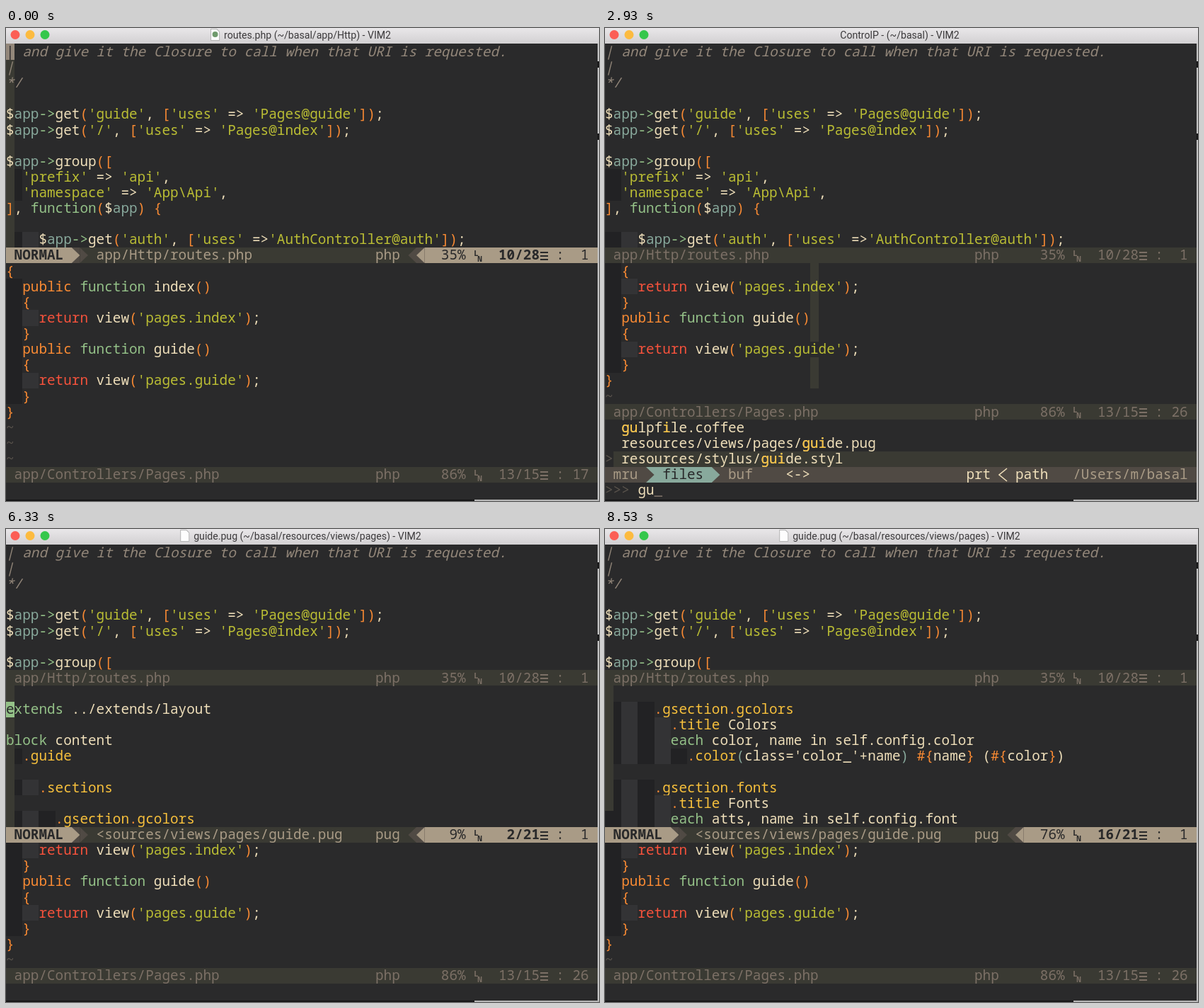
Write an HTML page with a canvas that moves like this. It is 838 px wide and 668 px high and loops after 8760 ms.

```html
<!DOCTYPE html>
<html lang="en">
<head>
<meta charset="utf-8">
<title>Editor session</title>
<style>
  html, body { margin: 0; width: 100%; height: 100%; overflow: hidden; background: #2a2a2b; }
  canvas { display: block; }
</style>
</head>
<body>
<canvas id="stage" width="838" height="668"></canvas>
<script>
const ctx = document.getElementById('stage').getContext('2d');

const LOOP = 8760;
const CELL_W = 11.6, CELL_H = 22.12, GRID_TOP = 22.4, COLS = 72;
const BG = '#2a2a2b', FG = '#efdfba', OLIVE = '#3a3a33', TAN = '#a99b86', BROWN = '#504a44';
const DIM = '#7c7066', FAINT = '#59534c', GRAY = '#93877a', INK = '#29292a';
const GREEN = '#babd34', BLUE = '#88a99c', AQUA = '#94c188', ORANGE = '#f98a33', RED = '#f5523c', YELLOW = '#f7c03c';
const INDENT = ['#222224', '#333335'];

const PHP = {
  pattern: /(^[|*].*)|('[^']*')|(?<=\$)(app)|(->|function)|(public|[()[\]{}])|(return)/g,
  colors: [GRAY, GREEN, BLUE, AQUA, ORANGE, RED],
};
const PUG = {
  pattern: /(?<=^ *)(extends|block|each)\b|(?<=^ *(?:\.\w+)*)(\.)(?=\w)|(?<=^ *(?:\.\w+)*\.)(\w+)|((?<=\.color)\(|\)(?= #))|(#\{|\})/g,
  colors: [AQUA, ORANGE, YELLOW, BLUE, ORANGE],
};

// "start" is the file line number of the first stored line.
const routes = {
  path: 'app/Http/routes.php', type: 'php', total: 28, start: 10, syntax: PHP,
  lines: [
    '| and give it the Closure to call when that URI is requested.',
    '|',
    '*/',
    '',
    "$app->get('guide', ['uses' => 'Pages@guide']);",
    "$app->get('/', ['uses' => 'Pages@index']);",
    '',
    '$app->group([',
    "  'prefix' => 'api',",
    "  'namespace' => 'App\\Api',",
    '], function($app) {',
    '',
    "    $app->get('auth', ['uses' =>'AuthController@auth']);",
  ],
};
const pages = {
  path: 'app/Controllers/Pages.php', type: 'php', total: 15, start: 6, syntax: PHP,
  lines: [
    '{',
    '  public function index()',
    '  {',
    "    return view('pages.index');",
    '  }',
    '  public function guide()',
    '  {',
    "    return view('pages.guide');",
    '  }',
    '}',
  ],
};
const guide = {
  path: '<sources/views/pages/guide.pug', type: 'pug', total: 21, start: 1, syntax: PUG,
  lines: [
    '',
    'extends ../extends/layout',
    '',
    'block content',
    '  .guide',
    '',
    '    .sections',
    '',
    '      .gsection.gcolors',
    '        .title Colors',
    '        each color, name in self.config.color',
    "          .color(class='color_'+name) #{name} (#{color})",
    '',
    '      .gsection.fonts',
    '        .title Fonts',
    '        each atts, name in self.config.font',
  ],
};

const ROOT_FILES = ['config/font.yml', 'config/meta.yml', 'gulpfile.coffee', 'composer.json', 'composer.lock',
  'package.json', 'phpunit.xml', 'readme.md', 'test.txt', 'artisan'];
const NESTED_FILES = ['app/Controllers/Pages.php', 'resources/views/pages/guide.pug', 'resources/stylus/guide.styl'];
const QUERY = 'guide.pug';
const KEY_TIMES = [2830, 2880, 2930, 3030, 3110, 3200, 3290, 3380, 3430];

const colX = col => col * CELL_W;
const rowY = row => Math.round(GRID_TOP + row * CELL_H);

function fillCells(row, col, count, color) {
  const x = Math.round(colX(col));
  ctx.fillStyle = color;
  ctx.fillRect(x, rowY(row), Math.round(colX(col + count)) - x, rowY(row + 1) - rowY(row));
}

function drawText(row, col, string, color, style = '500') {
  ctx.font = `${style} 19.33px "Noto Sans Mono", monospace`;
  ctx.fillStyle = color;
  [...string].forEach((char, i) => {
    if (char !== ' ') ctx.fillText(char, colX(col + i), GRID_TOP + row * CELL_H + 17.5);
  });
}

function drawPolygon(color, ...points) {
  ctx.fillStyle = color;
  ctx.beginPath();
  points.forEach(([x, y]) => ctx.lineTo(x, y));
  ctx.fill();
}

function drawDot(x, y, radius, color) {
  ctx.fillStyle = color;
  ctx.beginPath();
  ctx.arc(x, y, radius, 0, 2 * Math.PI);
  ctx.fill();
}

// Full-height triangle in one cell, pointing right (dir 1) or left (dir -1).
function drawArrow(row, col, dir, color) {
  const base = colX(dir > 0 ? col : col + 1), y0 = rowY(row), y1 = rowY(row + 1);
  drawPolygon(color, [base, y0], [base + dir * CELL_W, (y0 + y1) / 2], [base, y1]);
}

function colorize(line, { pattern, colors }) {
  const result = Array(line.length).fill(FG);
  for (const match of line.matchAll(pattern)) {
    const color = colors[match.slice(1).findIndex(Boolean)];
    result.fill(color, match.index, match.index + match[0].length);
  }
  return result;
}

function drawBuffer(buffer, row, height, first, cursor = null, showCursor = true) {
  for (let i = 0; i < height; i++) {
    const number = first + i, line = buffer.lines[number - buffer.start], y = row + i;
    if (line === undefined) {
      drawText(y, 0, '~', FAINT);
      continue;
    }
    const indent = line.search(/\S|$/);
    for (let col = 0; col < indent; col += 2) fillCells(y, col, 2, INDENT[col / 2 % 2]);

    const onCursorLine = cursor && cursor.line === number;
    if (cursor && !onCursorLine) fillCells(y, cursor.col - 1, 1, OLIVE);

    const colors = colorize(line, buffer.syntax);
    [...line].forEach((char, col) => drawText(y, col, char, colors[col], colors[col] === GRAY ? 'italic 500' : '500'));

    if (onCursorLine && showCursor) {
      const col = cursor.col - 1;
      fillCells(y, col, 1, col < indent ? INDENT[0] : colors[col] || FG);
      drawText(y, col, line[col] || ' ', BG);
    }
  }
}

function drawStatus(row, buffer, { line, col }, active) {
  fillCells(row, 0, COLS + 0.1, OLIVE);
  if (active) {
    fillCells(row, 0, 8, TAN);
    fillCells(row, 8, 1, BROWN);
    drawArrow(row, 8, 1, TAN);
    drawArrow(row, 9, 1, BROWN);
    drawArrow(row, 49, -1, BROWN);
    fillCells(row, 50, 1, BROWN);
    drawArrow(row, 50, -1, TAN);
    fillCells(row, 51, COLS - 51 + 0.1, TAN);
    drawText(row, 1, 'NORMAL', INK, 'bold');
  }
  const label = active ? TAN : DIM, info = active ? INK : DIM;
  drawText(row, active ? 11 : 1, buffer.path, label);
  drawText(row, 45, buffer.type, label);
  drawText(row, 52, `${Math.floor(100 * line / buffer.total)}%`.padStart(4), info);
  drawText(row, 60, `${line}/${buffer.total}`.padStart(5), info, active ? 'bold' : '500');
  drawText(row, 67, ':' + String(col).padStart(3), info);

  ctx.font = 'bold 11px "Noto Sans Mono", monospace';
  ctx.fillText('L', colX(57), rowY(row) + 12);
  ctx.fillText('N', colX(57) + 5, rowY(row) + 20);
  for (const dy of [6, 11, 16]) ctx.fillRect(colX(65) + 1, rowY(row) + dy, 11, 2);
}

function drawTitle(title, icon) {
  const gradient = ctx.createLinearGradient(0, 0, 0, 22);
  gradient.addColorStop(0, '#e9e7e9');
  gradient.addColorStop(1, '#d2d0d2');
  ctx.fillStyle = gradient;
  ctx.fillRect(0, 0, 838, 22);
  ['#fb5e55', '#fcbb40', '#35c74b'].forEach((color, i) => drawDot(13 + 21 * i, 9.5, 6.5, color));

  ctx.font = '14.1px Roboto, sans-serif';
  const iconWidth = icon ? 19 : 0;
  const x = 416.5 - (ctx.measureText(title).width + iconWidth) / 2;
  if (icon) {
    drawPolygon('#b5b5b5', [x, 1], [x + 9, 1], [x + 13, 5], [x + 13, 18], [x, 18]);
    drawPolygon('#fdfdfd', [x + 1, 2], [x + 8.5, 2], [x + 12, 5.5], [x + 12, 17], [x + 1, 17]);
    if (icon === 'php') drawDot(x + 6.5, 9, 4, '#6f9a6c');
  }
  ctx.fillStyle = '#3c3a3c';
  ctx.fillText(title, x + iconWidth, 15);
}

function drawEdges() {
  ctx.fillStyle = '#c3c3c3';
  ctx.fillRect(836, 22, 2, 646);
  ctx.fillStyle = '#151516';
  ctx.fillRect(836, 47, 2, 9);
  ctx.fillRect(836, 149, 2, 9);
  ctx.fillRect(0, 666, 662, 2);
  ctx.fillStyle = '#b5b5b5';
  ctx.fillRect(662, 666, 176, 2);
}

const typedAt = t => QUERY.slice(0, KEY_TIMES.filter(key => key <= t).length);

// Positions of the query's letters, taken in order from the file name on.
function matchPositions(path, query) {
  const base = path.lastIndexOf('/') + 1;
  let from = path.includes(query[0], base) ? base : 0;
  return [...query].map(char => {
    const at = path.indexOf(char, from);
    from = at + 1;
    return at;
  });
}

function findFiles(query) {
  if (!query) return ROOT_FILES;
  return [...ROOT_FILES, ...NESTED_FILES].filter(path => !matchPositions(path, query).includes(-1));
}

function drawFinder(files, query) {
  const row = 27, first = row - files.length;
  fillCells(26, 1, COLS - 0.9, OLIVE);
  drawText(26, 0, '>', FAINT);
  files.forEach((path, i) => {
    drawText(first + i, 2, path, FG);
    for (const at of matchPositions(path, query)) drawText(first + i, 2 + at, path[at], YELLOW);
  });

  fillCells(row, 0, COLS + 0.1, BROWN);
  fillCells(row, 5, 8, BLUE);
  drawArrow(row, 5, 1, BROWN);
  drawArrow(row, 13, 1, BLUE);
  drawText(row, 1, 'mru', TAN);
  drawText(row, 7, 'files', INK);
  drawText(row, 15, 'buf', TAN);
  drawText(row, 22, '<->', FG);
  drawText(row, 44, 'prt', FG);
  drawText(row, 50, 'path', FG);
  drawText(row, 57, '/Users/m/basal', TAN);
  ctx.strokeStyle = FG;
  ctx.lineWidth = 1.6;
  ctx.beginPath();
  ctx.moveTo(568, 622);
  ctx.lineTo(557, 631);
  ctx.lineTo(568, 640);
  ctx.stroke();
}

function pagesCursor(t) {
  if (t < 500) return { line: 13, col: 17 };
  if (t < 660) return { line: 12, col: 3 };
  if (t < 830) return { line: 11, col: 17 };
  if (t < 960) return { line: 12, col: 3 };
  if (t < 1130) return { line: 13, col: 17 };
  if (t < 1360) return { line: 13, col: 18 };
  return { line: 13, col: Math.min(26, 19 + Math.floor((t - 1360) / 38.57)) };
}

function guideLine(t) {
  if (t < 6330) return 1;
  if (t < 6560) return 2;
  if (t < 7300) return Math.min(14, 3 + Math.floor((t - 6560) / 54.54));
  return t < 7460 ? 15 : 16;
}

const routesCursor = { line: 10, col: 1 };
const pagesFirst = height => 13 - Math.ceil(height / 2);
const drawMessage = () => drawText(28, 0, '"resources/views/pages/guide.pug" 21L, 478C', FG);

function drawEditing(t) {
  const inRoutes = t < 160, cursor = pagesCursor(t);
  drawTitle(inRoutes ? 'routes.php (~/basal/app/Http) - VIM2' : 'Pages.php (~/basal/app/Controllers) - VIM2', 'php');
  drawBuffer(routes, 0, 13, 10, inRoutes ? routesCursor : null);
  drawStatus(13, routes, routesCursor, inRoutes);
  drawBuffer(pages, 14, 13, pagesFirst(13), inRoutes ? null : cursor);
  drawStatus(27, pages, cursor, !inRoutes);
}

function drawSearching(t) {
  const query = typedAt(t), files = findFiles(query), cursor = pagesCursor(t);
  const height = 12 - files.length, opening = t < 2330;
  drawTitle('ControlP - (~/basal) - VIM2');
  drawBuffer(routes, 0, 13, 10);
  drawStatus(13, routes, routesCursor, false);
  drawBuffer(pages, 14, height, pagesFirst(height), cursor, false);
  drawStatus(14 + height, pages, cursor, opening);
  drawFinder(files, query);
  if (opening) {
    fillCells(21, 25, 1, FG);
  } else if (t >= 5160) {
    drawMessage();
  } else {
    const prompt = typedAt(t - 30);
    drawText(28, 0, '>>>', FAINT);
    drawText(28, 4, prompt, FG);
    drawText(28, 4 + prompt.length, '_', DIM);
  }
}

function drawReading(t) {
  const cursor = { line: guideLine(t), col: 1 };
  drawTitle('guide.pug (~/basal/resources/views/pages) - VIM2', 'page');
  drawBuffer(routes, 0, 8, 10);
  drawStatus(8, routes, routesCursor, false);
  drawBuffer(guide, 9, 9, Math.max(1, cursor.line - 8), cursor);
  drawStatus(18, guide, cursor, true);
  drawBuffer(pages, 19, 8, pagesFirst(8));
  drawStatus(27, pages, pagesCursor(t), false);
  if (t < 6330) drawMessage();
}

function render() {
  const t = performance.now() % LOOP;
  ctx.fillStyle = BG;
  ctx.fillRect(0, 0, 838, 668);
  if (t < 2300) drawEditing(t);
  else if (t < 5260) drawSearching(t);
  else drawReading(t);
  drawEdges();
  requestAnimationFrame(render);
}
render();
</script>
</body>
</html>
```
